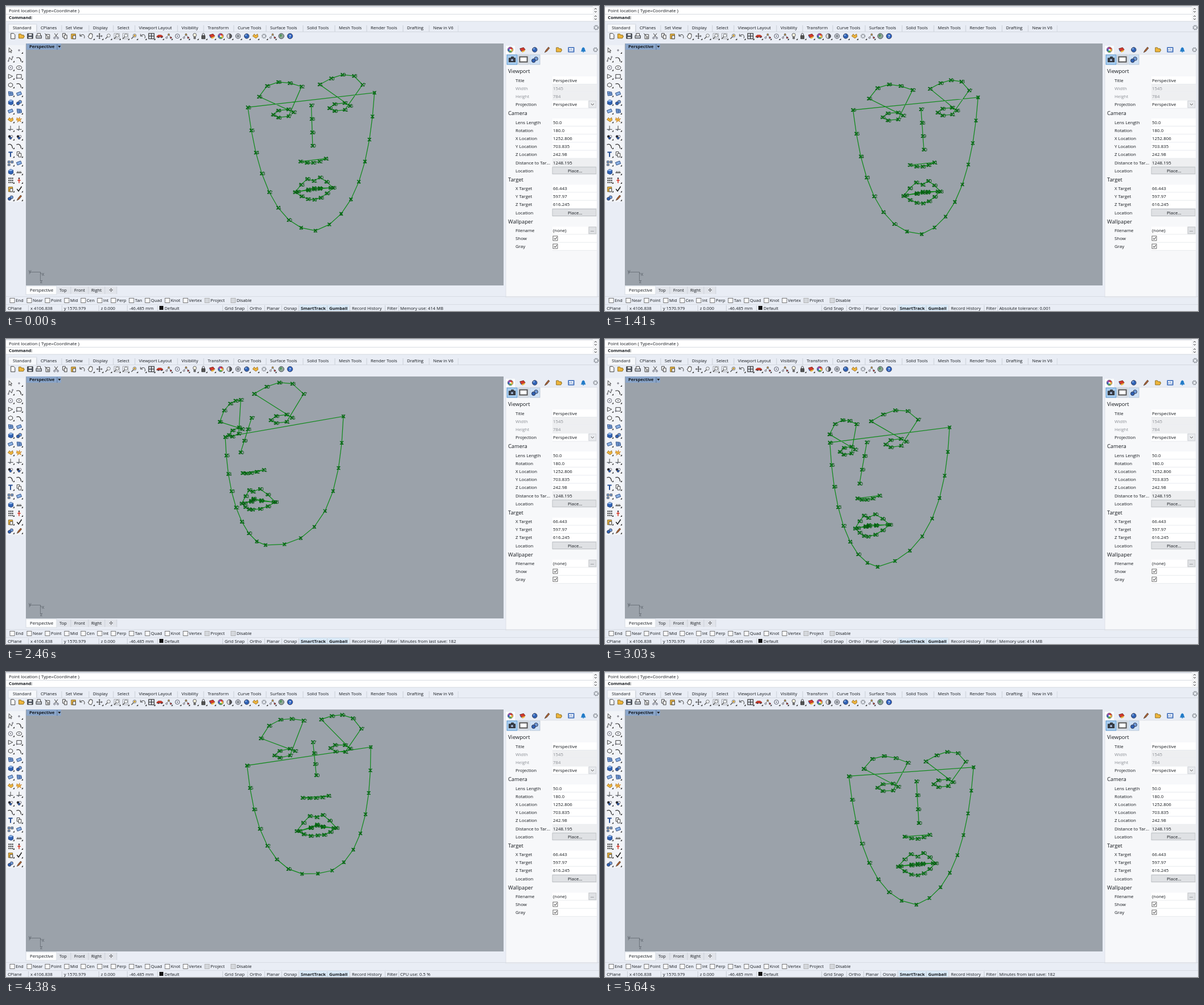
An HTML page that plays this animation: 1044x537 px, repeating every 5.7 s.

```html
<!DOCTYPE html>
<html lang="en">
<head>
<meta charset="utf-8">
<title>Face landmarks in a viewport</title>
<style>
html, body { margin: 0; width: 100%; height: 100%; overflow: hidden; background: #e9edf5; }
svg { display: block; width: 100vw; height: 100vh; }
text { font: 7.7px "Open Sans", "Noto Sans", sans-serif; fill: #14181d; white-space: pre; }
.b { font-weight: 700; }
.h { font-size: 9.3px; }
.p { font-size: 7.9px; }
.dim { font-size: 7.9px; fill: #8b8f95; }
.num { font: 9px "Liberation Sans", Arial, sans-serif; fill: #07520f; text-anchor: middle; }
.axis { font: 9px "Liberation Sans", Arial, sans-serif; fill: #5d646c; }
</style>
</head>
<body>
<svg id="stage" viewBox="0 0 1044 537" xmlns="http://www.w3.org/2000/svg"></svg>
<script>
const stage = document.getElementById('stage');
const parts = [];
const add = s => parts.push(s);
const rect = (x, y, w, h, fill, stroke) =>
  add(`<rect x="${x}" y="${y}" width="${w}" height="${h}" fill="${fill}"${stroke ? ` stroke="${stroke}" stroke-width=".8"` : ''}/>`);
const text = (x, y, s, cls = '') => add(`<text x="${x}" y="${y}" class="${cls}">${s}</text>`);
const line = (d, stroke = '#c9ced6', w = 1) =>
  add(`<path d="${d}" fill="none" stroke="${stroke}" stroke-width="${w}"/>`);

// Icon pieces, drawn around 0,0 in a 12 px box
const shape = (d, fill = 'none', stroke = '#333', w = 1) =>
  `<path d="${d}" fill="${fill}" stroke="${stroke}" stroke-width="${w}"/>`;
const ball = (fill, r = 4.5, x = 0, y = 0, stroke = '#334') =>
  `<circle cx="${x}" cy="${y}" r="${r}" fill="${fill}" stroke="${stroke}" stroke-width=".8"/>`;
const BLUE = '#2f62b5', GOLD = '#eeb53c', RED = '#d63a2a';
const glass = ball('#f4f8fc', 3, 1, -1, '#555') + shape('M-1 1L-5 5', 'none', '#555', 1.4);
const hues = [RED, GOLD, '#53ab45', BLUE, '#9b46a8'];
const ICONS = {
  page: shape('M-3.5-5H1.5L4-2.5V5H-3.5Z', '#fff'),
  folder: shape('M-5 4V-4H-1L0-2H4V0H5.5L3.5 4Z', GOLD, '#8b6a18'),
  disk: shape('M-5-4.5H5V4.5H-5Z', '#4b5360') + shape('M-2.5-4H3V-1H-2.5ZM-3 1.5H3V4H-3Z', '#eee', 'none'),
  print: shape('M-5-1H5V4H-5Z', '#b9bec6') + shape('M-3-1V-5H3V-1', '#fff'),
  note: shape('M-3-3H4V5H-3Z', '#fff') + shape('M-5-5L0 0M-1 1H3M-1 3H3'),
  cut: shape('M-3-5L2 2M3-5L-2 2') + ball('none', 1.6, -3, 3.5) + ball('none', 1.6, 3, 3.5),
  copy: shape('M-4-5H1V2H-4Z', '#fff') + shape('M-1-2H4V5H-1Z', '#fff'),
  paste: shape('M-4-4H4V5H-4Z', GOLD, '#7a6128') + shape('M-1-1H4V5H-1Z', '#fff'),
  undo: shape('M4 4C6-3 0-5-4 0M-4-4V0H0'),
  hand: shape('M-3 4L-5 0-3-1V-4H-1V-5H1V-4H3V1L1 5Z', '#fff'),
  move: shape('M0-5V5M-5 0H5M-1.5-3.5L0-5 1.5-3.5M-1.5 3.5L0 5 1.5 3.5M-3.5-1.5L-5 0-3.5 1.5M3.5-1.5L5 0 3.5 1.5'),
  zoom: glass,
  zoomBox: shape('M-5-5H5V5H-5Z', 'none', '#888', .7) + glass,
  zoomDot: glass + ball(GOLD, 1.4, 1, -1, '#a70'),
  grid: shape('M-5-5H5V5H-5ZM0-5V5M-5 0H5', '#dfe5ee', '#222', 1.2),
  car: shape('M-6 2V0L-3-2H2L5 0V2Z', RED, '#8a2015', .7) + ball('#333', 1, -3, 2) + ball('#333', 1, 3, 2),
  nodes: shape('M-4 3L0-3 4 3', 'none', '#777') + ball('#fff', 1.5, -4, 3) + ball(GOLD, 1.5, 0, -3) + ball(RED, 1.5, 4, 3),
  circle: ball('none', 4) + ball('#444', .6),
  bulb: ball('#f7f4dc', 3.2, 0, -2) + shape('M-1.5 1.5H1.5V5H-1.5Z', '#777', '#555'),
  lock: shape('M-2-1V-3C-2-6 2-6 2-3V-1') + shape('M-3-1H3V5H-3Z', '#555'),
  layer: shape('M-5-2L2-4 5 0-2 3Z', RED, '#702020') + shape('M-5-2L-2 3 0 5-4 2Z', BLUE, 'none') + shape('M-2 3L5 0 4 3 0 5Z', GOLD, 'none'),
  wheel: ball('#fff', 5) + hues.map((c, i) =>
    `<path d="M0 0V-4.6A4.6 4.6 0 0 1 4.4-1.4Z" fill="${c}" transform="rotate(${i * 72})"/>`).join('') + ball('#fff', 1.7, 0, 0, 'none'),
  half: ball('#555') + shape('M0-4A4 4 0 0 0 0 4Z', '#ddd', 'none'),
  ring: ball('#c9ced4') + ball('#858b93', 2.4, 0, 0, 'none'),
  blue: ball(BLUE) + ball('#86aee8', 1.5, -1.4, -1.6, 'none'),
  globe: ball('#90a696', 5) + shape('M-3-2L0-4 1-1-2 2Z', '#4a9257', 'none'),
  help: ball('#2d62c1', 5) + '<text x="0" y="3" text-anchor="middle" class="b" style="fill:#fff">?</text>',
  gold: shape('M-5 0L-2-4 0-1 4-4 5 1 1 4Z', GOLD, '#8b5d14', .8),
  gear: '<circle r="3.3" fill="none" stroke="#8b9097" stroke-width="2.4" stroke-dasharray="1.7 .9"/>',
  arrow: shape('M-3-5V4L-1 2 1 5 2 4 0 1H3Z', '#fff'),
  dot: ball('#fff', 1.3),
  zig: shape('M-4 4L-2-3 2 2 4-4') + ball('#fff', 1, -4, 4) + ball('#fff', 1, 4, -4),
  oval: '<ellipse rx="5" ry="3.5" fill="none" stroke="#333"/>' + ball('#444', .6),
  box: shape('M-4.5-3.5H4.5V3.5H-4.5Z') + ball('#fff', 1, -4.5, 3.5),
  tri: shape('M-4-4L4 0-4 4Z'),
  hex: shape('M-4-2L0-4 4-2V2L0 4-4 2Z'),
  curve: shape('M-5-2C0-4 3-2 4 5', 'none', '#333', 1.3),
  cube: shape('M-4-2L0-5 5-3V3L1 5-4 3Z', BLUE, '#27457c') + shape('M-4-2L0-5 5-3 1-1Z', '#94b9ea', 'none'),
  pair: ball('#6e9ad9', 3, 2, -1) + ball(BLUE, 3, -2, 2),
  mesh: shape('M-4-4L4-3 5 3-3 4Z', '#7fa6dd', '#27457c') + shape('M0-4L1 4M-4 0L5 0', 'none', '#27457c', .7),
  pipe: shape('M-5-1L3-4 5 1-3 4Z', '#8bb1e3', '#27457c'),
  burst: shape('M-4-4L-1-1 1-5 1-1 5-2 2 1 4 4 0 2-3 5-2 1-5 1Z', GOLD, '#b66916', .7),
  trim: shape('M-5 2H5M0-5V2') + shape('M-5 2H0V5Z', '#68707b', 'none'),
  dots: ball('#222', 2.2, -2, -1) + ball('#fff', 2.2, 2, -1) + ball(BLUE, 2.2, 0, 2),
  letter: shape('M-4-4H4M0-4V5', 'none', '#294f92', 2.2),
  tiles: shape('M-5-4H-1V0H-5ZM1-4H5V0H1ZM-5 2H-1V5H-5Z', '#7da2d8', '#333', .8),
  flat: shape('M-5 2H5M-3-1V2M0-1V2M3-1V2', 'none', '#444', 1.3),
  matrix: '<path d="M-4-4H5M-4 0H5M-4 4H5" stroke="#333" stroke-width="2.4" stroke-dasharray="2.2 1.2"/>',
  post: shape('M0-5V5M-3 0H3', 'none', RED, 1.7) + ball('#333', 1, 0, -4),
  check: shape('M-4 0L-1 4 5-5', 'none', '#222', 1.7),
  brush: shape('M-4 5L-2 1 3-5 5-3 0 3Z', '#a86134', '#4d3424', .8),
  screen: shape('M-5-4H5V4H-5Z', '#fff', BLUE, 1.6) + shape('M-3 2V-1M0 2V-2M3 2V0', 'none', BLUE),
  bell: shape('M-4 3C-2 1-3-4 0-4S2 1 4 3Z', '#217bc8', '#217bc8') + ball('#217bc8', 1, 0, 4, 'none'),
  camera: shape('M-5-2H-2L-1-4H2L3-2H5V4H-5Z', '#39414d') + ball('#b9d5f5', 2, 0, 1),
  frame: shape('M-6-4H6V4H-6Z', '#fff', '#555', 1.8)
};
const icon = (name, x, y, k = 1) => add(`<g transform="translate(${x} ${y}) scale(${k})">${ICONS[name]}</g>`);
const corner = (x, y) => add(`<path d="M${x} ${y}h3v-3z" fill="#333"/>`);

// Command area
rect(0, 0, 1044, 537, '#e9edf5');
rect(0, 2, 1041, 25, '#fff');
line('M0 1.5H1041', '#b9bec6', .8);
line('M0 14.5H1034M0 27H1044', '#ccd1d8', .8);
text(5, 11, 'Point location ( Type=Coordinate )', 'p');
text(5, 23, 'Command:', 'b');
rect(1033, 1, 10, 26, '#f2f3f5');
for (const y of [5, 18]) line(`M1036 ${y + 1}l2-2 2 2M1036 ${y + 4}l2 2 2-2`, '#444');

// Toolbar
rect(4, 32, 50, 14, '#f6f8fb', '#cdd3dc');
[[12, 'Standard'], [61, 'CPlanes'], [105, 'Set View'], [153, 'Display'], [196, 'Select'], [234, 'Viewport Layout'],
 [309, 'Visibility'], [355, 'Transform'], [408, 'Curve Tools'], [465, 'Surface Tools'], [530, 'Solid Tools'],
 [586, 'Mesh Tools'], [642, 'Render Tools'], [706, 'Drafting'], [752, 'New in V6']].forEach(([x, s], i) => {
  text(x, 41, s);
  if (i) line(`M${x - 7} 34V45`);
});
line('M796 34V45M54 45.5H1044', '#d3d8e0');
icon('gear', 1039, 38);
('page folder disk print note cut copy paste undo hand move zoom zoomBox zoomBox zoomDot undo grid car nodes circle nodes ' +
 'bulb lock layer wheel half ring blue gold gear nodes globe help').split(' ').forEach((n, i) => {
  const x = 12 + i * 15.25;
  icon(n, x, 53, .95);
  if (i > 8 && i < 31) corner(x + 4, 60);
});

// Left tools, two per row
rect(1, 69, 32, 276, '#f2f4f8');
('arrow dot zig curve circle oval tri box hex curve mesh pipe cube pair pipe mesh gold burst trim trim dots dots curve curve ' +
 'letter copy tiles pipe cube flat matrix post paste check pair brush').split(' ').forEach((n, i) => {
  const x = 8 + i % 2 * 15, y = 78 + (i >> 1) * 15.27;
  icon(n, x, y, .92);
  if (i) corner(x + 4, y + 6);
});

// Viewport
rect(35, 66, 841, 426, '#9ba2aa');
rect(36, 66, 61, 11, '#8aa5c9');
text(41, 74, 'Perspective', 'b');
line('M90 67V77', '#5d7596');
add('<path d="M91.5 70h5l-2.5 3.5z" fill="#222"/>');
line('M40 468.5H60.5V485M60 468L63 473', '#6d747c');
text(40, 470, 'y', 'axis');
text(63, 475, 'x', 'axis');
text(60, 488, 'z', 'axis');
add('<g id="face"></g>');

// Viewport tabs
rect(90, 494, 105, 13, '#e1e4ea');
rect(35, 493, 54, 15, '#fbfcfd', '#d0d5dd');
[[42, 'Perspective'], [94, 'Top'], [120, 'Front'], [150, 'Right']].forEach(([x, s]) => text(x, 503, s));
line('M114 494V507M145 494V507M174 494V507M195 494V507', '#cbd0d8');
icon('move', 185, 500, .6);

// Right panel
rect(880, 85, 161, 428, '#f7f8fa', '#d9dde4');
rect(880, 70, 16, 15, '#fbfcfd');
['wheel', 'layer', 'blue', 'brush', 'folder', 'screen', 'bell', 'gear'].forEach((n, i) => icon(n, 888 + i * 21.4, 77, .95));
['camera', 'frame', 'pair'].forEach((n, i) => {
  rect(882 + i * 20, 86, 18, 17, ['#a9cdef', '#dde2e9', '#cfe2f7'][i], i ? '#aebdce' : '#3c82c4');
  icon(n, 891 + i * 20, 94, 1.1);
});
const rows = (y, list) => list.forEach(([label, value, off], i) => {
  const ty = y + i * 14.2, cls = off === 2 ? 'dim' : 'p', button = value === 'Place...';
  rect(962, ty - 6.5, 78, 13, off ? '#eeeff1' : '#fff');
  if (button) rect(962, ty - 6, 77, 12, '#dfe1e4', '#b5b8bc');
  line(`M962 ${ty + 7}H1040`, '#e3e6ea', .7);
  text(897, ty + 3, label, cls);
  text(button ? 989 : 963, ty + 3, value, cls);
});
[[118, 'Viewport'], [192, 'Camera'], [309, 'Target'], [383, 'Wallpaper']].forEach(([y, s]) => text(884, y, s, 'h'));
rows(130.5, [['Title', 'Perspective'], ['Width', '1545', 2], ['Height', '784', 2], ['Projection', 'Perspective']]);
rows(204.5, [['Lens Length', '50.0'], ['Rotation', '180.0'], ['X Location', '1252.806'], ['Y Location', '703.835'],
  ['Z Location', '242.98'], ['Distance to Tar...', '1248.195', 1], ['Location', 'Place...']]);
rows(321, [['X Target', '66.443'], ['Y Target', '597.97'], ['Z Target', '616.245'], ['Location', 'Place...']]);
rows(395, [['Filename', '(none)'], ['Show', ''], ['Gray', '']]);
rect(1026, 167, 13, 12, '#e8eaed', '#c2c6cc');
line('M1030 172l2.5 2.5 2.5-2.5', '#555');
rect(1026, 389, 13, 12, '#dfe1e4', '#b5b8bc');
text(1029, 397, '...');
for (const y of [409, 423]) {
  rect(963, y - 4, 8, 8, '#fff', '#444');
  line(`M965 ${y}l1.7 2 3-4`, '#222');
}

// Snap row and status bar
line('M0 511.5H1044M0 525.5H1044', '#d3d8e0', .8);
[[17, 'End'], [47, 'Near'], [79, 'Point'], [113, 'Mid'], [142, 'Cen'], [171, 'Int'], [195, 'Perp'], [227, 'Tan'], [255, 'Quad'],
 [290, 'Knot'], [322, 'Vertex'], [360, 'Project'], [406, 'Disable']].forEach(([x, s], i) => {
  rect(x - 10, 514.5, 8, 8, i > 10 ? '#d4d7dc' : '#fff', i > 10 ? '#aaa' : '#555');
  text(x, 521, s);
});
rect(517, 526, 48, 11, '#d8e8f6');
rect(566, 526, 38, 11, '#d8e8f6');
[[3, 'CPlane'], [43, 'x 4106.838'], [102, 'y 1570.979'], [167, 'z 0.000'], [217, '-46.485 mm'], [279, 'Default'], [385, 'Grid Snap'],
 [429, 'Ortho'], [459, 'Planar'], [489, 'Osnap'], [519, 'SmartTrack', 'b'], [569, 'Gumball', 'b'], [609, 'Record History'],
 [671, 'Filter']].forEach(([x, s, cls], i) => {
  text(x, 535, s, cls);
  if (i && i !== 5) line(`M${x - 3.5} 527V537`);
});
line('M267 527V537M691.5 527V537');
rect(270, 528, 7, 7, '#111');
add('<text id="info" x="694" y="535"></text>');

// Head model: 68 landmarks as [x from the midline, y, depth]
const span = (a, b) => Array.from({ length: b - a + 1 }, (_, i) => a + i);
const { PI, cos, sin, abs, sign } = Math;
const flip = ([x, y, z]) => [-x, y, z];

const jaw = span(0, 16).map(i => {
  const s = 1 - abs(i - 8) / 8;
  return [sign(8 - i) * 111.5 * (1 - .3 * s - .7 * s ** 2.3), 165.5 + 230 * (1.44 * s - .44 * s ** 3), .45 * s ** 2.5];
});
const brow = [[91, 149], [76.5, 132], [56.5, 127.5], [36.5, 131.5], [16, 140]].map(([x, y], k) => [x, y, .57 + .09 * k]);
const nose = span(0, 3).map(k => [0, 175 + 23.7 * k, .82 + .09 * k]);
const nostrils = span(-2, 2).map(k => [-11.2 * k, 276 - 1.2 * k * k, .83 - .015 * k * k]);
const eyeAt = a => [49.5 + 18 * cos(a), 183.5 - 7 * sin(a), .65 - .05 * cos(a)];
const eye = span(0, 5).map(k => eyeAt(k * PI / 3));
const otherEye = span(0, 5).map(k => flip(eyeAt(PI - k * PI / 3)));
const lips = span(0, 11).map(k => {
  const d = abs(k > 6 ? k - 9 : k - 3);
  const y = k > 6 ? 324 + 17 * cos(d * PI / 6) : [308, 303, 312, 324][d];
  return [33.5 * (abs(k - 6) / 3 - 1), y, .78 - .05 * d];
});
const mouth = span(0, 7).map(k => {
  const c = cos(k * PI / 4);
  return [29 * c ** 3, 321.5 + 2 * c * c - sin(k * PI / 4), .76 - .14 * c * c];
});
const head = [...jaw, ...brow, ...brow.map(flip).reverse(), ...nose, ...nostrils, ...eye, ...otherEye, ...lips, ...mouth];

// Each argument is [constant, by depth, by height]: shift, shift, width and tilt of the face
const along = ([a, b = 0, c = 0], z, v) => a + b * z + c * v;
const pose = (dx, dy, wide, tilt) => head.map(([x, y, z]) => {
  const v = (y - 160) / 100;
  return [537 + 3.3 * v + x * along(wide, z, v) + along(dx, z, v), y + x * along(tilt, z, v) + along(dy, z, v)];
});
const mix = (a, b, fx, fy = fx, dx = 0, dy = 0) =>
  a.map((p, i) => [p[0] + (b[i][0] - p[0]) * fx + dx, p[1] + (b[i][1] - p[1]) * fy + dy]);

const rest = pose([0], [0], [1], [-.115]);
const right = pose([27, 36], [0, -15, -.5], [.99, -.07], [-.06, .06, -.08]);
const low = pose([-5, -9, -1.5], [12, 13], [.985], [-.13, 0, .025]);
const left = pose([-47, -70, -4], [-11, -30, -3.5], [.93, -.2, .05], [-.17, -.15, .14]);
const front = pose([-5, 9], [8, 13, 1], [.98], [-.11]);
const up = pose([-4, 8, 2], [-17, -42, -2], [.975, 0, .04], [-.145, .09]);
const end = pose([2, 11, -1.5], [10, 9], [.985], [-.07, 0, -.01]);

const KEYS = [[0, rest], [870, right], [1890, low], [2460, left], [2580, mix(left, left, 0, 0, 0, -6)],
  [3150, mix(left, front, .3, .9)], [3630, front], [4230, mix(front, up, .75)], [4380, up],
  [4950, mix(up, end, .5, .35, 14)], [5550, mix(up, end, 1, .97, 11)], [5640, end]];
const PAUSES = [[1170, 1230], [1800, 1860], [2310, 2460], [3240, 3420], [3990, 4140], [4230, 4380]];
const LOOP = 5700, STEP = 30;

const NOTES = ['Memory use: 414 MB', 'Available physical memory: 4439 MB', 'CPU use: 0.6 %',
  'Absolute tolerance: 0.001', 'Minutes from last save: 182'];
function noteAt(t) {
  const s = NOTES[Math.floor((t + 660) / 690) % NOTES.length];
  return t > LOOP / 2 ? s.replace('0.6', '0.5') : s;
}

function faceAt(t) {
  const k = KEYS.findIndex(([from]) => from > t);
  if (k < 0) return end;
  const [[t0, a], [t1, b]] = [KEYS[k - 1], KEYS[k]];
  const u = (t - t0) / (t1 - t0);
  return mix(a, b, u * u * (3 - 2 * u));
}

stage.innerHTML = parts.join('');
const info = document.getElementById('info');
const face = document.getElementById('face');
face.innerHTML = '<path id="wire" fill="none" stroke="#108a1b" stroke-width="1.25"/>' +
  '<path id="marks" fill="none" stroke="#08791a" stroke-width="1.5"/>' +
  head.map((_, i) => `<text class="num">${i}</text>`).join('');
const wire = document.getElementById('wire'), marks = document.getElementById('marks');
const labels = face.querySelectorAll('text');
const CHAINS = [span(0, 16), [...span(17, 21), ...span(36, 41)], [...span(22, 26), ...span(42, 47)],
  span(27, 30), span(31, 35), span(48, 59), span(60, 67)];

let shown = -1;
function draw(now) {
  let t = Math.floor(now % LOOP / STEP) * STEP;
  const pause = PAUSES.find(([a, b]) => t > a && t < b);
  if (pause) t = pause[0];
  if (t === shown) return;
  shown = t;
  const pts = faceAt(t).map(p => p.map(v => +v.toFixed(1)));
  wire.setAttribute('d', CHAINS.map(c => 'M' + c.map(i => pts[i]).join('L') + 'Z').join(''));
  marks.setAttribute('d', pts.map(([x, y]) => `M${x - 3} ${y - 3}l6 6m0-6l-6 6`).join(''));
  pts.forEach(([x, y], i) => {
    labels[i].setAttribute('x', x + (i > 9 ? 1 : 0));
    labels[i].setAttribute('y', y + 3.2);
  });
  info.textContent = noteAt(t);
}
const start = performance.now();
function tick() {
  draw(performance.now() - start);
  requestAnimationFrame(tick);
}
tick();
</script>
</body>
</html>
```
